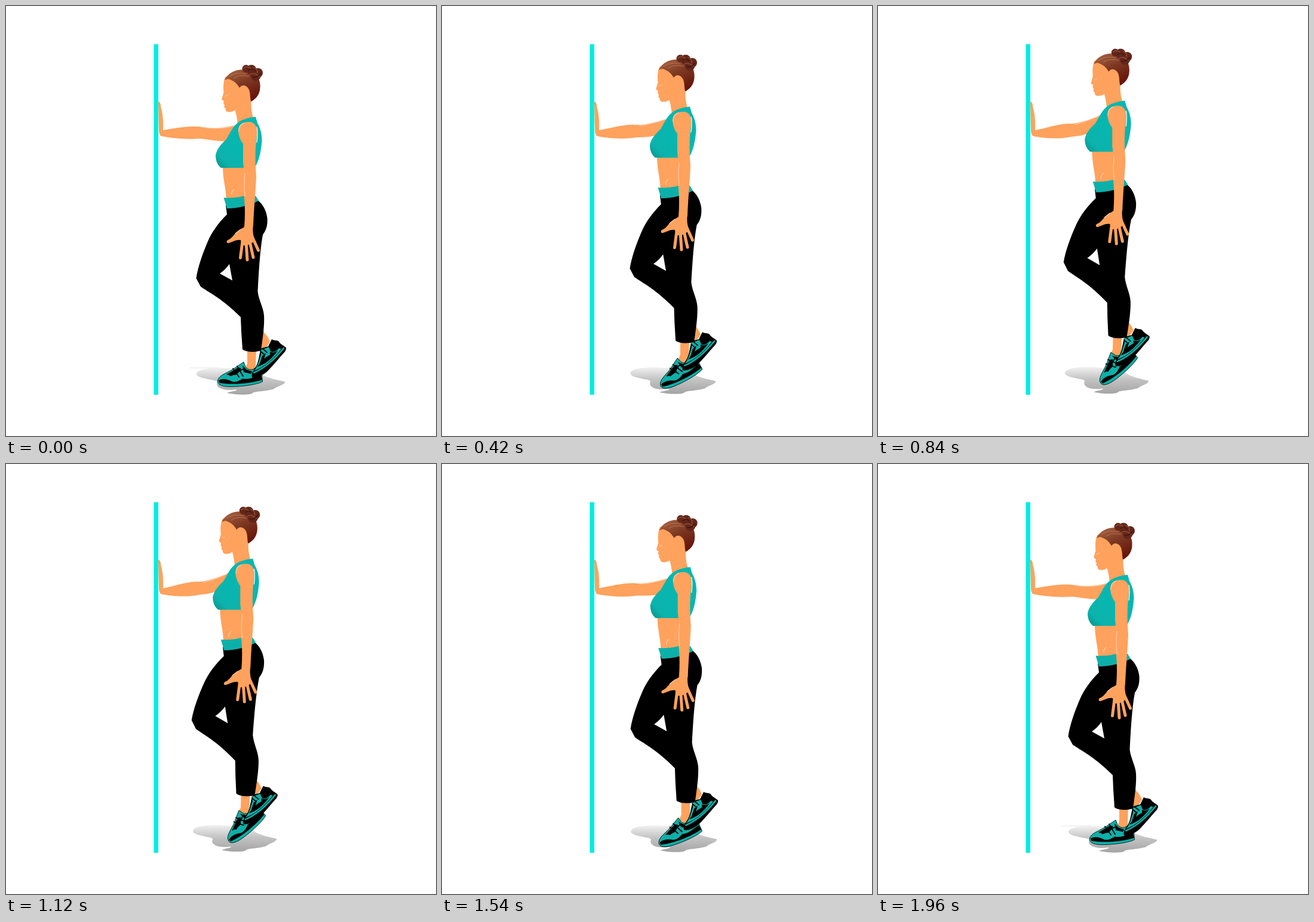
An HTML page for the animation above (2100 ms loop, 720 px wide and 720 px high).

```html
<!DOCTYPE html>
<html lang="en">
<head>
<meta charset="utf-8">
<title>Wall calf raise</title>
<style>
  html, body { margin: 0; height: 100%; overflow: hidden; background: #fff; }
  svg { display: block; width: 100vw; height: 100vh; }
  .skin { fill: #ffa25d; }
  .teal { fill: #0db0a9; }
  .line { fill: none; stroke-linecap: round; stroke-linejoin: round; }
  .glow { stroke: #ffc9a6; stroke-width: 1.3; }
  .lace { stroke: #000; stroke-width: 1.8; }
</style>
</head>
<body>
<svg viewBox="0 0 720 720">
  <defs>
    <linearGradient id="shade" x1="0" y1="0" x2="0" y2="1">
      <stop offset="0" stop-color="#f1f1f1"/><stop offset=".45" stop-color="#c4c4c4"/><stop offset="1" stop-color="#a4a4a4"/>
    </linearGradient>
    <linearGradient id="hair" x1=".2" y1="0" x2=".75" y2="1">
      <stop offset="0" stop-color="#a5603f"/><stop offset=".45" stop-color="#7d3822"/><stop offset="1" stop-color="#641208"/>
    </linearGradient>
    <linearGradient id="top" x1="0" y1="1" x2=".45" y2=".5">
      <stop offset="0" stop-color="#079089"/><stop offset=".35" stop-color="#0cb3ac"/><stop offset="1" stop-color="#08b6b0"/>
    </linearGradient>
  </defs>

  <path id="ground" fill="#e6e6e6" d="M307 605.5h50v1h-50z"/>
  <path id="shadow" fill="url(#shade)" d="M319 616C320 608 340 606 365 606L420 610C430 622 450 625 467 629C468 634 455 636 449 641C440 645 415 645 413 648C408 652 385 651 370 648C375 645 388 645 386 642C365 645 352 640 353 632C357 626 345 627 335 624C325 622 320 620 319 616Z"/>
  <path fill="#00ede2" d="M247.500 64h7.500v587h-7.500z"/>
  <path id="reach" class="skin"/>
  <path id="reachGlow" class="line glow"/>

  <g class="body">
    <path class="skin" d="M384 166L411 154Q409 172 414 187L416 215V330H369C369 305 363 293 363 268L388 205Q388 190 384 176Z"/>
    <path class="line glow" d="M378 316Q377 311 382 307"/>
  </g>

  <path class="skin lifted" d="M429 540L433 548Q438 552 442 562L432 577H425Z"/>
  <path class="skin leg" d="M404 570L404 598 401 606 410 613 418 607 419 570Z"/>

  <g id="shoe">
    <path class="teal" stroke="#000" stroke-width=".8" d="M354.500 627C356 619 368 615 377 610C384 606 390 601 398 596L401 604C404 609 412 611 417 606L428 612L429.500 629C420 634 395 637.500 375 637.500C362 637.500 353 634 354.500 627Z"/>
    <path d="M356 627C362 623 372 625 379 629C386 630 390 628 396 624C408 626 416 621 427 618L429 626C410 632 380 635 357 631ZM369 617Q381 610 389 605L394 607 387 617 376 619ZM396 602L403 609 412 612 410 616 398 613Z"/>
    <path class="line lace" d="M380 607L390 621M387 603L397 620M376 619L399 607"/>
  </g>

  <path class="leg" fill-rule="evenodd" d="M368 334L370 349C355 364 345 378 338 394C329 415 321 438 318.500 456L326 470C342 481 362 490 393 521L394 545 396 575C402 580 418 580 427 577C430 555 433 535 432 518C431 505 423 492 421.500 478C423 450 425 410 430 383C437 374 438 365 437.500 355C436 343 430 331 421 325ZM374 432Q368 441 358 448L379 459.500Z"/>

  <g class="lifted">
    <path d="M428 573L439 570L445 558C450 561 454 559 457 562C460 567 466 569 469 572Q470 576 465 581C455 592 445 605 435 614C427 620 418 623 412 622Q410 617 415 609C422 601 423 590 425 581Z"/>
    <path class="teal" d="M427 576L440 571 443 578C447 581 453 578 457 573L461 574C449 590 432 605 415 611C422 604 424 592 427 584Z"/>
    <path d="M442 579Q449 582 455 577C445 591 434 600 421 604Q430 590 442 584ZM429 586L435 581 432 591 425 598Z"/>
    <path class="line" stroke="#0db0a9" stroke-width="2.500" d="M465 573C452 589 434 606 415 614"/>
    <path class="line lace" d="M426 578L433 584M430 574L437 580"/>
  </g>

  <g class="body">
    <path class="teal" d="M364.500 321Q383 322 398 318L418 318 423 326Q415 331 400 335Q384 339 370 339Z"/>
    <path fill="url(#top)" d="M418 185.500L421 196C426 205 428 212 428.500 225C427 244 424 257 418 268L397 271H360C354 266 351 259 351 250C353 238 363 229 369 223C377 210 379 202 390 194Q401 187 418 185.500Z"/>
    <path class="line" stroke="#fff" stroke-width="1.300" d="M420 203Q422 213 420 228"/>
    <path class="skin" d="M389 210C388 199 397 193 408 194C418 195 421 203 420 216C417 240 417 260 419 285C418 310 415 340 414 368Q412 376 416 392Q410 402 395 401L393 392C385 390 376 397 371 397Q368 395 371 392C379 390 383 379 391 375L399 370Q401 345 399 322C396 300 400 280 397 262V231Q390 222 389 210Z"/>
    <path class="line" stroke="#ffa25d" stroke-width="5" d="M396 394L392.500 421.500M402 395L404 425M408 394L414 421M412 386L422.500 409"/>
    <path class="line glow" d="M390 210Q390 198 399 196M400 280Q398 300 400 318M384 381L393 374"/>

    <path class="skin" d="M367 119C363 129 364 139 364.500 145L361.500 155Q361 158 365 159L364 163 366 166 365 169Q368 171 368 174C368 178 374 179 383 175C391 171 405 168 411 157V122L385 110Z"/>
    <path fill="url(#hair)" d="M366 124C373 110 388 105 402 107C418 109 427 122 425.500 137C425 149 417 157 410 160C408 151 410 140 403 135C397 131 393 134 391 137C387 130 382 125 372 122Z"/>
    <path class="line" stroke="#b97a5b" stroke-width="1.200" opacity=".7" d="M374 118Q387 110 402 114M382 121Q391 114 407 118"/>
    <g fill="#64261a">
      <circle cx="402" cy="105" r="6.500"/><circle cx="411" cy="107" r="8.500"/><circle cx="422" cy="112" r="8"/><circle cx="418" cy="117" r="8.500"/>
    </g>
    <path class="line" stroke="#a5684c" stroke-width="1.300" opacity=".7" d="M398 104Q406 99 411 106M415 103Q422 105 421 112M409 114Q416 111 424 118"/>
    <path class="line" stroke="#42140d" stroke-width="1.500" d="M406 108Q411 103 417 109M413 119Q420 121 426 113"/>
    <path class="line glow" d="M367 151L371 149"/>
  </g>
</svg>
<script>
const STEP = 140;
const RISE = [0, 3, 10, 17, 22, 26, 27, 27, 27, 25, 20.5, 13, 4, 1, 0];
const $ = id => document.getElementById(id);
const transform = (selector, value) =>
  document.querySelectorAll(selector).forEach(el => el.setAttribute('transform', value));

function pose(rise) {
  const dx = -0.175 * rise;
  const lean = 0.023 * (rise / 27) ** 2.4;
  const stretch = 1 + 0.015 * rise / 27;

  transform('.body', `translate(${dx} ${-rise})`);
  transform('.leg', `translate(${400 + dx} ${325 - rise}) matrix(1 ${lean} ${-lean} ${stretch} 0 0) translate(-400 -325)`);
  transform('.lifted', `translate(${-0.53 * rise} ${-0.7 * rise})`);
  transform('#shoe', `translate(${0.66 * rise} ${0.033 * rise * (31 - rise)}) rotate(${-1.3 * rise} 354 627)`);
  transform('#shadow', `translate(${319 - 0.22 * rise} ${-0.06 * rise}) scale(${1 - 0.002 * rise} 1) translate(-319 0)`);
  $('ground').style.opacity = rise < 5 ? 1 : 0;

  // The palm stays on the wall while the shoulder follows the body.
  const elbow = 202 - 0.18 * rise, shoulder = 200 - 0.72 * rise;
  const upper = `C345 ${elbow + 4 - 0.2 * rise} 365 ${shoulder + 5} ${384 + dx} ${shoulder}`;
  $('reach').setAttribute('d', `M255 160Q259 160 259.500 170C263 181 263.500 195 263 208
    C285 204 305 ${elbow - 1} 323 ${elbow} ${upper}L${375 + dx} ${226 - 0.75 * rise}
    C360 ${228 - 0.6 * rise} 345 ${224 - 0.25 * rise} 325 ${222 - 0.12 * rise}
    C300 224 277 221 260 218Q256 216 256 207Z`);
  $('reachGlow').setAttribute('d', `M330 ${elbow + 1}${upper}`);
}

function frame(now) {
  pose(RISE[Math.floor(now / STEP) % RISE.length]);
  requestAnimationFrame(frame);
}
pose(0);
requestAnimationFrame(frame);
</script>
</body>
</html>
```
